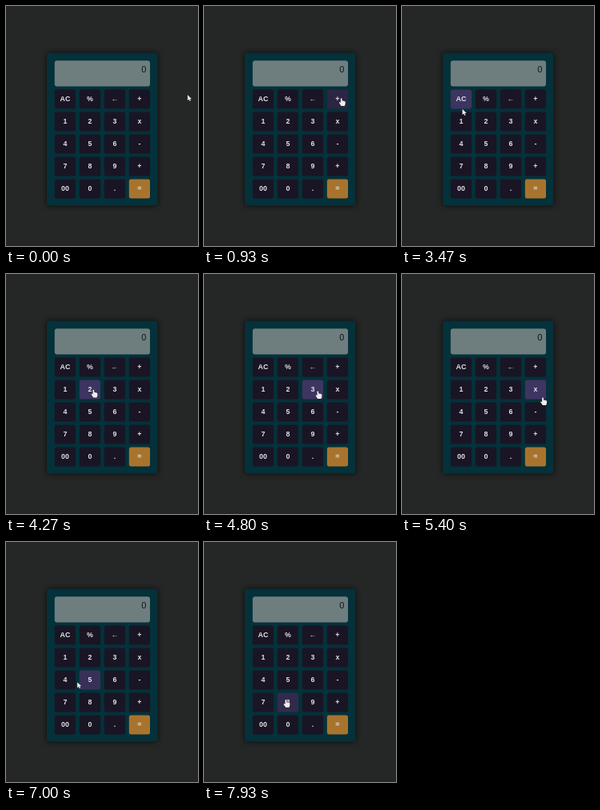
An HTML page with a canvas that plays this animation: 240x300 px, repeating every 8000 ms.

```html
<!DOCTYPE html>
<html lang="en">
<head>
<meta charset="utf-8">
<title>Calculator</title>
<style>
  html, body { margin: 0; width: 100%; height: 100%; overflow: hidden; background: #252726; }
  canvas { display: block; filter: blur(.4px); }
</style>
</head>
<body>
<canvas id="stage" width="240" height="300"></canvas>
<script>
const ctx = document.getElementById('stage').getContext('2d');
const LOOP = 8000, FADE = 300;
const KEY_W = 26.2, KEY_H = 24;
const labels = ['AC', '%', '←', '+', '1', '2', '3', 'x', '4', '5', '6', '-',
                '7', '8', '9', '+', '00', '0', '.', '='];
const keys = labels.map((label, i) => ({
  label, x: 60.8 + (i % 4) * 31, y: 104.6 + Math.floor(i / 4) * 28
}));

// The pointer snakes through the rows at an even pace: time in ms, x, y
const path = [
  [0, 227, 111], [900, 173, 115], [3200, 74, 115], [3750, 77, 143],
  [5150, 164, 147], [5400, 176, 154], [5700, 168, 171],
  [7250, 74, 176], [7400, 74, 196], [LOOP, 106, 197]
];

const arrow = new Path2D('M0 0V8L1.9 6.2L3.1 9L4.5 8.4L3.3 5.7H5.8Z');
const hand = new Path2D('M-1 .8Q0-.5 1 .8V4Q2 3.2 2.7 4.2Q3.7 3.6 4.2 4.6Q5.6 4.2 5.6 5.8V8Q5.4 9.5 4.5 11H-.2L-3 7Q-3.5 5.6-2.2 5.7L-1 6.8Z');

function pointerAt(t) {
  const i = Math.max(1, path.findIndex(p => p[0] >= t));
  const [a, b] = [path[i - 1], path[i]];
  const k = Math.max(0, (t - a[0]) / (b[0] - a[0]));
  return { x: a[1] + (b[1] - a[1]) * k, y: a[2] + (b[2] - a[2]) * k };
}

const inside = (key, p) =>
  p.x >= key.x && p.x <= key.x + KEY_W && p.y >= key.y && p.y <= key.y + KEY_H;

// Share of the recent past spent over the key: a linear hover fade
function hoverAmount(key, t) {
  const steps = 30;
  let hits = 0;
  for (let i = 0; i < steps; i++) hits += inside(key, pointerAt(t - i * FADE / steps));
  return hits / steps;
}

function mix(from, to, k) {
  return `rgb(${from.map((c, i) => Math.round(c + (to[i] - c) * k))})`;
}

function box(x, y, w, h, radius, color) {
  ctx.fillStyle = color;
  ctx.beginPath();
  ctx.roundRect(x, y, w, h, radius);
  ctx.fill();
}

function drawPointer(p, shape) {
  ctx.save();
  ctx.translate(p.x, p.y);
  ctx.scale(0.9, 0.9);
  ctx.lineWidth = 1;
  ctx.strokeStyle = '#16161c';
  ctx.stroke(shape);
  ctx.fillStyle = '#eee';
  ctx.fill(shape);
  ctx.restore();
}

function draw(t) {
  ctx.fillStyle = '#252726';
  ctx.fillRect(0, 0, 240, 300);

  ctx.save();
  ctx.shadowColor = 'rgba(0,0,0,.75)';
  ctx.shadowBlur = 7;
  box(51, 58.5, 138.5, 191, 4, '#04313a');
  ctx.restore();

  box(60.8, 68.2, 119.2, 32.4, 3, '#6e7e7e');
  ctx.textAlign = 'right';
  ctx.font = '11px "Liberation Sans", Arial, sans-serif';
  ctx.fillStyle = '#111416';
  ctx.fillText('0', 175.3, 83);

  ctx.textAlign = 'center';
  ctx.font = 'bold 8.8px "Liberation Sans", Arial, sans-serif';
  for (const key of keys) {
    const color = key.label === '='
      ? '#a8742d'
      : mix([25, 21, 36], [62, 53, 98], hoverAmount(key, t));
    box(key.x, key.y, KEY_W, KEY_H, 2.5, color);
    ctx.fillStyle = '#e2e1e5';
    ctx.fillText(key.label, key.x + KEY_W / 2, key.y + 14.6);
  }

  const p = pointerAt(t);
  drawPointer(p, keys.some(key => inside(key, p)) ? hand : arrow);
}

function frame() {
  draw(performance.now() % LOOP);
  requestAnimationFrame(frame);
}
frame();
</script>
</body>
</html>
```
